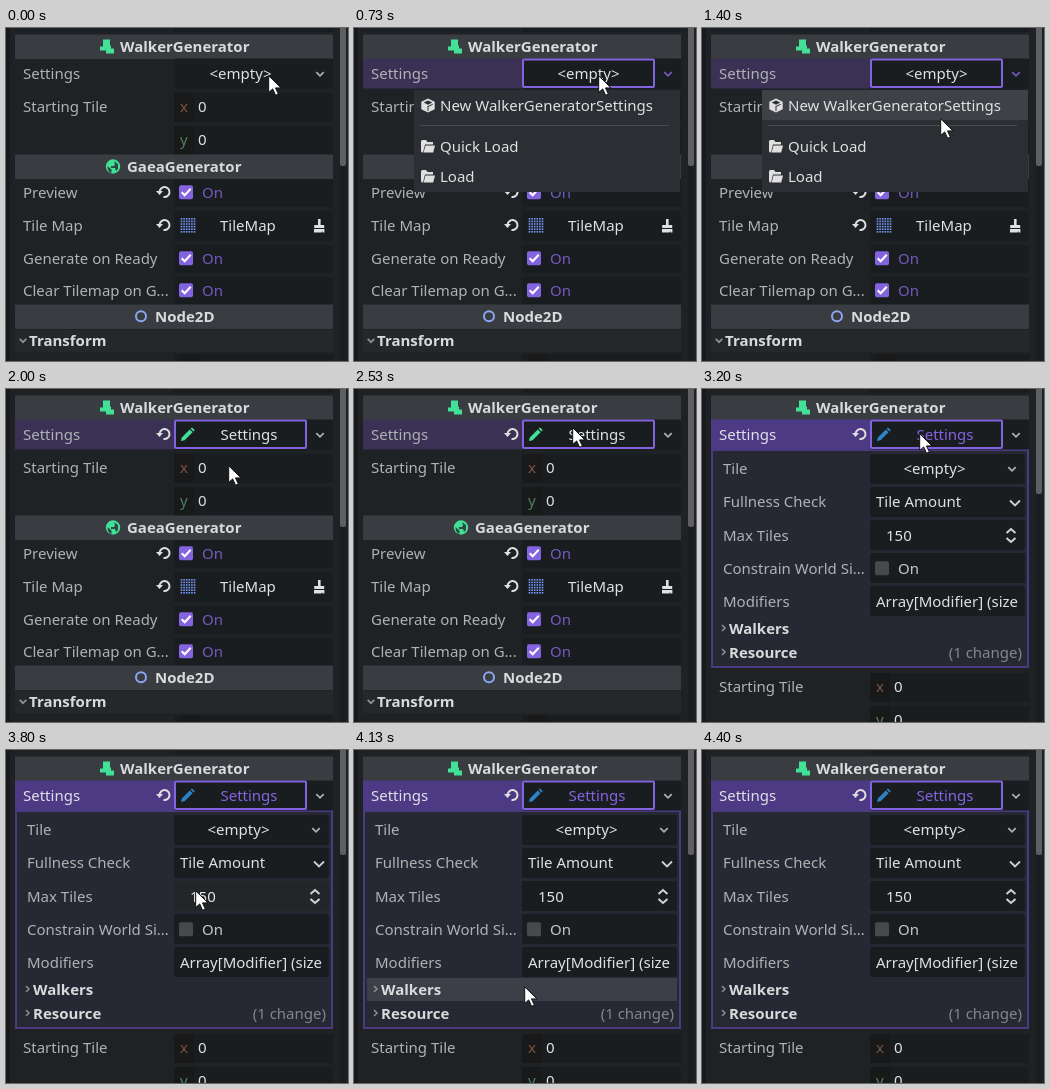
These frames come from a looping animation (342x333 px, 4.94 s). An HTML page:

```html
<!DOCTYPE html>
<html>
<head>
<meta charset="utf-8">
<style>
html, body { margin: 0; width: 100%; height: 100%; overflow: hidden; background: #1f2225; }
svg { display: block; width: 342px; height: 333px; font: 15px "Noto Sans", sans-serif; }
.b { font-weight: 700; }
.m { text-anchor: middle; }
.e { text-anchor: end; }
</style>
</head>
<body>
<svg id="stage" viewBox="0 0 342 333"></svg>
<script>
const LABEL = '#b0b2b4', VALUE = '#dfe0e1', FIELD = '#1a1d20', ACCENT = '#8463e0', GREEN = '#42e197';

const rect = (x, y, w, h, fill, extra = '') =>
  `<rect x="${x}" y="${y}" width="${w}" height="${h}" fill="${fill}" ${extra}/>`;
const text = (s, x, y, fill = LABEL, cls = '') =>
  `<text x="${x}" y="${y}" fill="${fill}" class="${cls}">${s.replace(/</g, '&lt;')}</text>`;
const fill = (d, color) => `<path d="${d}" fill="${color}"/>`;
const line = (d, color, w = 2) => `<path d="${d}" fill="none" stroke="${color}" stroke-width="${w}"/>`;
const group = (id, body) => `<g id="${id}">${body}</g>`;
const at = (x, y, body) => `<g transform="translate(${x} ${y})">${body}</g>`;

const field = (y, h = 30, w = 159) => rect(168, y, w, h, FIELD, 'rx="2"');
const header = (y, name, x) => rect(9, y - .5, 318, 24.5, '#393d41', 'rx="1"') + text(name, x, y + 17, '#d9dadb', 'b');
const chevron = (x, y, color = '#adaeb0', r = 3.7) => line(`M${x - r} ${y - r / 2}l${r} ${r}l${r} ${-r}`, color, 1.8);
const arrow = (x, y) => line(`M${x} ${y - 3}l3 3l-3 3`, '#8d8f92', 1.5);
const revert = y => at(158, y, line('M-4.5 0A5 5 0 1 1 -.5 5', '#e0e0e0') + fill('M-8 -1h7l-3.5 4z', '#e0e0e0'));
const pencil = color => fill('M175 52l.8-3.6 8-8 2.8 2.8-8 8zM184.6 39.6l1.4-1.2 2.8 2.8-1.4 1.2z', color);
const folder = y => at(67, y, fill('M0 2q0-1.5 1.5-1.5H5l1.5 2H12V5H4L2 13Q0 13 0 11.5z', '#e0e0e0') + fill('M4.5 6H14l-1.8 7H2.6z', '#e0e0e0'));
const check = y => rect(173, y - 7.7, 14, 14, ACCENT, 'rx="2"') + line(`M175.7 ${y - .8}l3 3l6-6.5`, '#fff');
const toggle = (name, y) => field(y - 14, 28) + text(name, 17, y + 5) + check(y) + text('On', 196, y + 5, '#7459bd');
const axis = (name, y, color, bg) =>
  field(y - 14, 29) + rect(168, y - 14, 20, 29, bg, 'rx="2"') + text(name, 174, y + 5, color) + text('0', 192, y + 5, VALUE);

function gridIcon() {
  let s = '';
  for (let i = 0; i < 36; i++) s += rect(174.7 + i % 6 * 2.6, 190 + (i / 6 | 0) * 2.6, 1.6, 1.6, '#7697f5');
  return s;
}

const lower =
  text('Starting Tile', 17, 84) +
  axis('x', 79, '#7c5443', '#191919') + axis('y', 112, '#4f7f62', '#171a19') +
  header(127, 'GaeaGenerator', 121) +
  `<circle cx="107" cy="138.5" r="7.2" fill="${GREEN}"/>` +
  fill('M101.5 138l4 3.5v3.5q-4-1-4-7zM108 133l4 3v5l-2 2-1-3h-4v-2h3l1-2z', '#2d4b42') +
  toggle('Preview', 165) + revert(164) +
  field(183) + text('Tile Map', 17, 203) + revert(197) + gridIcon() + text('TileMap', 214, 203, VALUE) +
  fill('M312 191h2.6v6h3.6v3h-10v-3h3.8zM308 201h10.4v3.5h-2v-1.5l-1 1.5H308z', '#e0e0e0') +
  toggle('Generate on Ready', 231) + toggle('Clear Tilemap on G...', 263) +
  header(277, 'Node2D', 149) +
  '<circle cx="135" cy="288.3" r="5" fill="none" stroke="#8da5f3" stroke-width="2"/>' +
  rect(9, 302, 318, 22, '#25282b') + chevron(17, 312.5, '#8d8f92', 3.3) + text('Transform', 23, 318, '#d9dadb', 'b') +
  field(326) + rect(174, 326, 20, 8, '#191919');

const sub = y => field(y, 30, 155);
const panel =
  rect(10, 61, 316, 217, '#262833', 'stroke="#4b3a80" stroke-width="2"') +
  [65, 98, 131, 164, 197].map(sub).join('') +
  text('Tile', 21, 85) + text('<empty>', 232.5, 85, VALUE, 'm') + chevron(310, 80) +
  text('Fullness Check', 21, 118) + text('Tile Amount', 174, 118, VALUE) + chevron(313, 114, '#d0d1d2', 5) +
  text('Max Tiles', 21, 152) + text('150', 184, 152, VALUE) +
  line('M304.5 144l4.5-4 4.5 4M304.5 149l4.5 4 4.5-4', '#d0d1d2') +
  text('Constrain World Si...', 21, 185) + rect(173, 172.3, 14, 14, '#48494c', 'rx="2"') + text('On', 196, 185, '#c6c7c9') +
  text('Modifiers', 21, 218) + text('Array[Modifier] (size', 174, 218, VALUE) +
  '<rect id="hover" x="13" width="310" fill="#fff"/>' +
  arrow(20, 239) + text('Walkers', 27, 245, '#d9dadb', 'b') +
  arrow(20, 263) + text('Resource', 27, 269, '#d9dadb', 'b') + text('(1 change)', 320, 269, '#85868c', 'e');

const menu =
  rect(60, 62, 266, 102, '#2b2f33') +
  '<rect id="item" x="60" y="62" width="266" height="30" fill="#3e4247"/>' +
  fill('M74 70.5l6.7 3.3v7.4L74 84.5l-6.7-3.3v-7.4z', '#e0e0e0') + fill('M74 72.5l4.3 2.1L74 76.7l-4.3-2.1z', '#2b2f33') +
  line('M74 78.5l4.7-2.2M74 78v5', '#2b2f33', 1) +
  text('New WalkerGeneratorSettings', 86, 83, VALUE) +
  rect(66, 97, 249, 1, '#484c50') +
  folder(111.5) + text('Quick Load', 86, 124, VALUE) +
  folder(141.5) + text('Load', 86, 154, VALUE);

const $ = id => document.getElementById(id);
$('stage').innerHTML =
  rect(0, 0, 342, 333, '#1f2225') + rect(0, 0, 4, 333, '#17191c') + field(-6, 10) +
  rect(334, 0, 6, 333, '#1a1d20') + '<rect id="bar" x="334" y="-4" width="6" rx="2" fill="#5d5f62"/>' +
  header(7, 'WalkerGenerator', 114) +
  fill('M97 11.5h7v6h1v3h3v5h-8v-3h-6v-4h3z', GREEN) +
  group('lower', lower) + group('panel', panel) +
  '<rect id="row" x="9" y="30.5" width="159" height="30"/>' +
  `<text id="label" x="17" y="51">Settings</text>` + field(30.5) +
  `<rect id="frame" x="169" y="31.5" width="131" height="27.5" rx="1" fill="${FIELD}" stroke="${ACCENT}" stroke-width="2"/>` +
  group('empty', text('<empty>', 234.5, 51, VALUE, 'm')) +
  group('made', revert(45)) +
  group('fresh', pencil(GREEN) + text('Settings', 243, 51, VALUE, 'm')) +
  group('open', pencil('#2f83c5') + text('Settings', 243, 51, ACCENT, 'm')) +
  group('plain', chevron(314, 46)) + group('lit', chevron(314, 46, '#7459bd')) +
  group('menu', menu) +
  group('cursor', '<path d="M.7 .8V17.4l4-3.5 2.9 6.4 2.8-1.2-2.9-6.2h5.5z" fill="#fff" stroke="#111" stroke-width="1"/>');

// Cursor tip: tick, x, y (15 ticks a second)
const path = [
  [0, 262, 47], [4, 244, 47], [11, 244, 47], [17, 243, 54], [21, 238, 90], [22, 238, 90],
  [25, 224, 83], [26, 223, 83], [29, 223, 83], [36, 219, 37], [37, 219, 37], [38, 218, 38],
  [42, 217, 44], [49, 217, 44], [53, 206, 61], [61, 172, 218], [62, 170, 236], [65, 168, 314], [66, 167, 345], [99, 167, 345]
];
const OPEN_MENU = 10, HOVER = 18, CREATE = 30, EXPAND = 46;
const rows = [[65, 30], [98, 30], [131, 30], [164, 30], [197, 30], [228, 23], [252, 23]];

function tip(k) {
  const i = path.findIndex(p => p[0] > k), [t0, x0, y0] = path[i - 1], [t1, x1, y1] = path[i];
  const f = (k - t0) / (t1 - t0);
  return [Math.round(x0 + (x1 - x0) * f), Math.round(y0 + (y1 - y0) * f)];
}

const show = (id, on) => $(id).style.display = on ? '' : 'none';
const set = (id, name, value) => $(id).setAttribute(name, value);

function draw(ms) {
  const k = Math.floor((Math.floor(ms / 10) + .34) * .15);
  const [x, y] = tip(k);
  const menuOpen = k >= OPEN_MENU && k < CREATE, made = k >= CREATE, open = k >= EXPAND;

  set('cursor', 'transform', `translate(${x} ${y})`);
  set('lower', 'transform', `translate(0 ${open ? 219 : 0})`);
  set('bar', 'height', open ? 109 : 142);
  set('row', 'fill', open ? '#4d3a84' : k >= OPEN_MENU ? '#3a3155' : 'none');
  set('label', 'fill', open ? '#e0dfe8' : LABEL);
  show('frame', k >= OPEN_MENU);
  show('menu', menuOpen);
  show('item', k >= HOVER);
  show('lit', menuOpen);
  show('plain', !menuOpen);
  show('empty', !made);
  show('made', made);
  show('fresh', made && !open);
  show('open', open);
  show('panel', open);

  const row = rows.find(([top, h]) => y >= top && y < top + h);
  show('hover', row);
  if (row) {
    const section = row[0] > 220;
    set('hover', 'x', section ? 13 : 168);
    set('hover', 'width', section ? 310 : 155);
    set('hover', 'y', row[0]);
    set('hover', 'height', row[1]);
    set('hover', 'opacity', section ? .1 : .04);
  }
}

const start = performance.now();
function tick() {
  draw((performance.now() - start) % 4940);
  requestAnimationFrame(tick);
}
tick();
</script>
</body>
</html>
```
